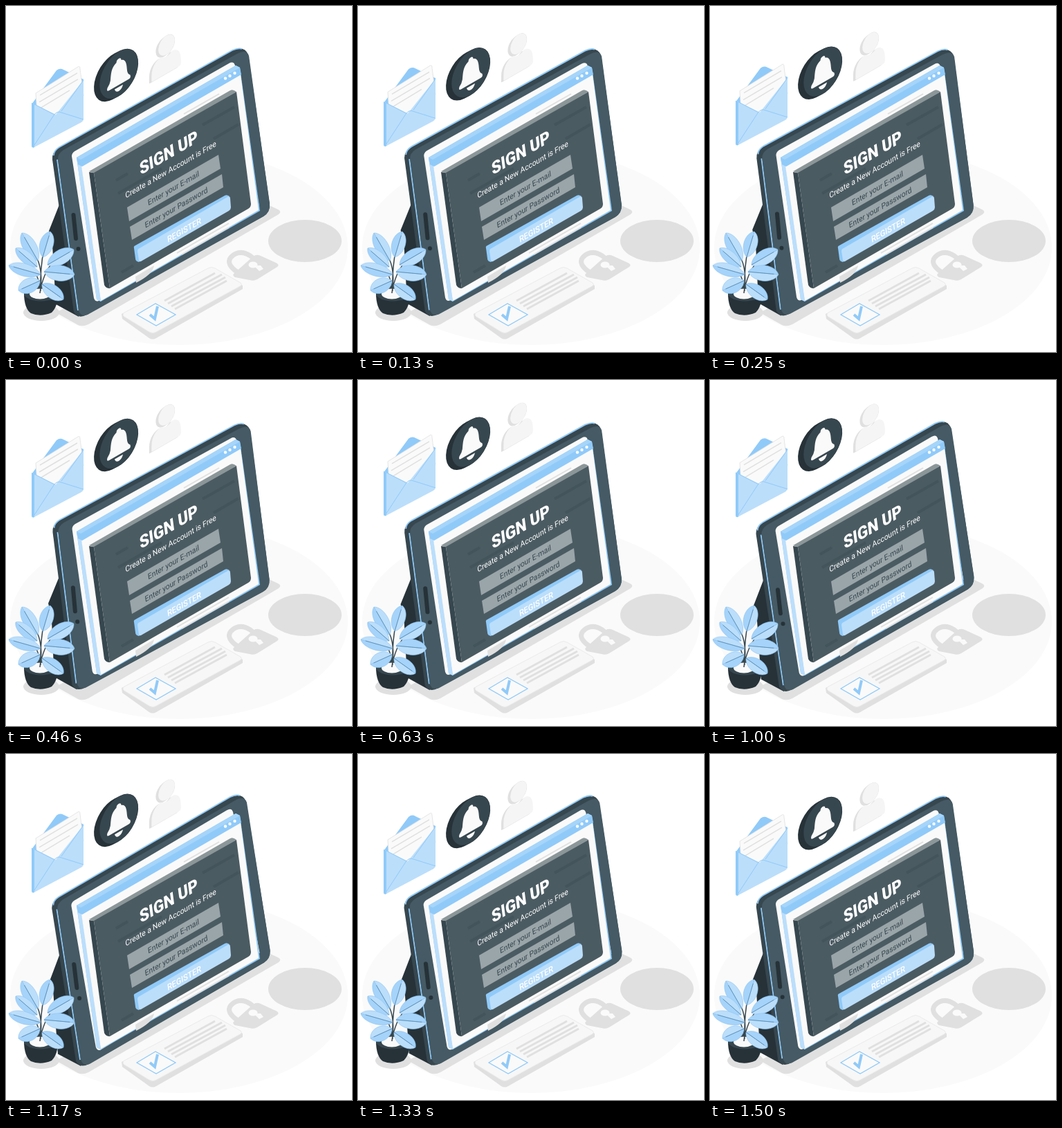
An HTML page that plays this animation: 500x500 px, repeating every 1.54 s.

```html
<!DOCTYPE html>
<html lang="en">
<head>
<meta charset="utf-8">
<title>Sign up</title>
<style>
  html, body { margin: 0; height: 100%; overflow: hidden; background: #fff; }
  svg { display: block; width: 100vw; height: 100vh; }
  text { font-family: Roboto, sans-serif; text-anchor: middle; fill: #fff; }
  .line { fill: none; stroke: #e0e0e0; }
</style>
</head>
<body>
<svg viewBox="0 0 500 500">
  <!-- floor -->
  <ellipse cx="250" cy="349" rx="244" ry="141" fill="#fafafa"/>
  <g fill="#e0e0e0">
    <ellipse cx="432" cy="339.500" rx="53" ry="30.500"/>
    <ellipse cx="51" cy="443" rx="26" ry="12"/>
    <path d="M72 443L104 461Q111 464 119 460L394 301Q399 297 393 294L376 286Z"/>
    <path d="M330 386Q326 389 331 392L352 396Q358 398 363 395L392 377Q396 374 390 371L368 361Q362 358 357 362Z"/>
    <path d="M335 385Q317 373 325 363Q337 351 353 361L362 368" class="line" stroke-width="7" style="fill:none"/>
  </g>
  <g fill="#fafafa">
    <ellipse cx="357" cy="374" rx="6.500" ry="4.500"/>
    <path d="M358 375L368 375L372 380L366 383Z"/>
  </g>

  <!-- check card -->
  <path d="M167 445L296 378L342 404V409L217 480Q212 483 207 480L168 452Z" fill="#e0e0e0"/>
  <path d="M171 443L292 379Q297 376 302 379L339 400Q342 403 338 405L217 471Q212 474 207 471L171 449Q167 446 171 443Z" fill="#f7f7f7" stroke="#ebebeb"/>
  <path d="M189 446L216 430L245 446L217 462Z" fill="#fafafa" stroke="#90caf9" stroke-width="1.300"/>
  <path d="M208 446L215 452L219 434" fill="none" stroke="#90caf9" stroke-width="4"/>
  <path d="M229 426L302 386M234 430L312 388M239 434L317 392M244 438L319 397" class="line" stroke-width="3"/>

  <!-- tablet body -->
  <g id="tablet">
    <path d="M83 272L62 325L67 345L72 431L105 449Z" fill="#263238"/>
    <path d="M67 222Q66 211 76 205L328 64Q344 57 350 70L381 285Q382 298 372 304L117 446Q104 453 98 442Z" fill="#37474f"/>
    <path d="M69 216Q69 209 77 204L327 64Q336 60 341 62M74 222L104 440" fill="none" stroke="#90caf9" stroke-width="1.800"/>
    <path d="M75 222Q74 214 83 208L334 69Q347 62 351 72L381 287Q382 298 372 304L118 446Q108 450 105 440Z" fill="#455a64"/>
    <path d="M95 217Q95 213 99 210L322 83Q329 79 331 86L366 290L134 426Q129 428 127 422Z" fill="#fafafa"/>
    <path d="M97.500 302L101 336" stroke="#263238" stroke-width="6" stroke-linecap="round"/>
    <circle cx="104.500" cy="351" r="3" fill="#263238"/>
  </g>

  <!-- browser window -->
  <path d="M102 219L332 86L338 89L367 296L137 427L131 424Z" fill="#90caf9"/>
  <path d="M102 219L108 222L137 427L131 424Z" fill="#bbdefb"/>
  <path d="M109 231L339 99L365 295L137 426Z" fill="#fafafa"/>
  <path d="M102 219L332 86L338 89L340 99L110 232L104 229Z" fill="#90caf9"/>
  <path d="M102 219L332 86L338 89L108 222Z" fill="#a6d5fa"/>
  <g fill="#fff">
    <circle cx="317" cy="104.500" r="2.200"/><circle cx="323.500" cy="101" r="2.200"/><circle cx="330.500" cy="97" r="2.200"/>
  </g>
  <path d="M178 206L228 177V183L180 211ZM187 391L214 375Q212 388 188 400Z" fill="#e0e0e0"/>
  <path d="M257 156L308 127M247 357L322 314M254 359L322 320" class="line" stroke-width="2"/>

  <!-- form panel -->
  <path d="M120 240L127 241L150 408Q144 408 142 403Z" fill="#37474f"/>
  <path d="M120 239L324 122Q328 120 333 124L128 242Z" fill="#8b9699"/>
  <path d="M127 241L333 124L354 286Q354 291 350 293L150 408Z" fill="#4b5b62"/>
  <path d="M159 252L176 242M162 271L225 235M284 172L330 146M167 385L184 375M300 192L336 171" stroke="#44545b" stroke-width="4"/>
  <path d="M175 291L307 215L310 235L178 311ZM179 319L312 243L314 262L182 338Z" fill="#9aa5a9"/>
  <path d="M185 350Q184 347 187 346L316 274Q319 272 323 275L192 370Q187 369 187 365Z" fill="#90caf9"/>
  <path d="M190 354Q190 351 193 350L320 276Q324 274 324 278L325 291Q325 294 322 296L195 369Q192 370 192 367Z" fill="#bbdefb"/>
  <g id="labels"></g>

  <!-- plant -->
  <path d="M26 415C26 430 30 440 36 444Q50 450 66 443C72 437 75 428 75 415Z" fill="#263238"/>
  <ellipse cx="50.500" cy="415" rx="24.500" ry="11.500" fill="#37474f"/>
  <ellipse cx="49" cy="416" rx="15" ry="7.500" fill="#fafafa"/>
  <path d="M49 415Q54 385 45 365M50 412Q49 380 55 350M50 408Q57 380 68 371M50 408Q45 385 36 378" fill="none" stroke="#37474f" stroke-width="1.500"/>
  <g id="leaves"></g>

  <!-- floating icons -->
  <g id="icons">
    <path d="M37 142L73 93Q78 89 83 92L112 106V140L45 165Z" fill="#90caf9"/>
    <path d="M43 126L104 88Q107 86 107 91L112 130L75 162L45 158Z" fill="#fafafa" stroke="#e0e0e0" stroke-width=".8"/>
    <path d="M49 129L103 97M48 139L104 106M49 148L92 122" class="line" stroke-width="1.500"/>
    <path d="M37 140L72 157L112 107V163Q112 166 109 168L41 204Q37 206 37 201Z" fill="#bbdefb"/>
    <path d="M37 140L41 142V204Q37 206 37 201Z" fill="#90caf9"/>
    <path d="M39 204L69 158Q74 151 80 154L112 164M41 142L70 157M80 152L112 107" fill="none" stroke="#90caf9"/>

    <g transform="matrix(.866 -.5 0 1 163 98)">
      <path d="M-9 -.5L0 0" stroke="#263238" stroke-width="65" stroke-linecap="round"/>
      <circle r="32" fill="#37474f"/>
      <path d="M0 -22Q4 -22 4 -18C13 -15 13 -6 14 3Q15 8 19 11Q21 16 16 16H-16Q-21 16 -19 11Q-15 8 -14 3C-13 -6 -13 -15 -4 -18Q-4 -22 0 -22ZM-7 19H7Q5 25 0 25Q-5 25 -7 19Z" fill="#fafafa"/>
    </g>

    <g transform="matrix(.866 -.5 0 1 232 56.500)" stroke-linecap="round">
      <path id="bust" d="M-25 40V33C-25 17 -15 13 -9 13Q0 20 9 13C15 13 24 17 24 33V38Q24 41 21 41H-22Q-25 41 -25 40Z" transform="translate(-4 .5)" fill="#e0e0e0"/>
      <path d="M-4 .5L0 0" stroke="#e0e0e0" stroke-width="28"/>
      <use href="#bust" style="display:none"/>
      <path d="M-25 40V33C-25 17 -15 13 -9 13Q0 20 9 13C15 13 24 17 24 33V38Q24 41 21 41H-22Q-25 41 -25 40Z" fill="#f5f5f5"/>
      <circle r="13.700" fill="#f5f5f5"/>
    </g>
  </g>
</svg>
<script>
const LOOP = 1540;
const $ = id => document.getElementById(id);

// Text lying on the slanted panel: content, centre, size, weight, colour
const label = (text, x, y, size, weight = 400, fill = '#fff') =>
  `<text transform="matrix(.866 -.5 .13 .98 ${x} ${y})" y="${size * 0.36}"
    style="font-size:${size}px;font-weight:${weight};fill:${fill}">${text}</text>`;

$('labels').innerHTML =
  label('SIGN UP', 235, 211.5, 25, 900) +
  label('Create a New Account is Free', 238, 236, 11.6) +
  label('Enter your E-mail', 242, 263, 11.4, 400, '#37474f') +
  label('Enter your Password', 246, 291, 11.4, 400, '#37474f') +
  label('REGISTER', 257.5, 323.5, 12.4, 500);

// Leaf from base to tip, bulging by `w` on both sides
function leaf([x, y, tipX, tipY, w]) {
  const dx = tipX - x, dy = tipY - y, len = Math.hypot(dx, dy);
  const at = (along, side) =>
    `${x + dx * along - dy / len * side} ${y + dy * along + dx / len * side}`;
  const half = side => `C${at(0.2, side)} ${at(0.85, side)} ${tipX} ${tipY}`;
  return `<g stroke="#8cc3f0" stroke-width=".6">
    <path d="M${x} ${y}${half(w)}L${x} ${y}" fill="#bbdefb"/>
    <path d="M${x} ${y}${half(-w)}L${x} ${y}" fill="#a5d3fa"/>
    <path d="M${x} ${y}L${at(0.85, 0)}" stroke="#5d8cb0" stroke-width=".9"/></g>`;
}

$('leaves').innerHTML = [
  [46, 368, 23, 328, 13], [53, 363, 64, 326, 13], [45, 377, 14, 350, 11],
  [60, 374, 98, 352, 14], [50, 388, 4, 375, 12], [55, 384, 99, 388, 15],
  [49, 397, 18, 411, 14], [52, 402, 83, 424, 13]
].map(leaf).join('');

// Triangle wave: 0 at the loop ends, 1 halfway
const tri = p => 1 - Math.abs(1 - 2 * (((p % 1) + 1) % 1));

function draw(now) {
  const p = now / LOOP;
  const lift = 10 * tri(p + 0.016);
  const tilt = 2 * tri(p + 0.25) - 1;
  $('icons').setAttribute('transform', `translate(0 ${0.3 - lift})`);
  $('tablet').setAttribute('transform', `rotate(${tilt} 222 256)`);
}

const start = performance.now();
function tick() {
  draw(performance.now() - start);
  requestAnimationFrame(tick);
}
draw(0);
tick();
</script>
</body>
</html>
```
